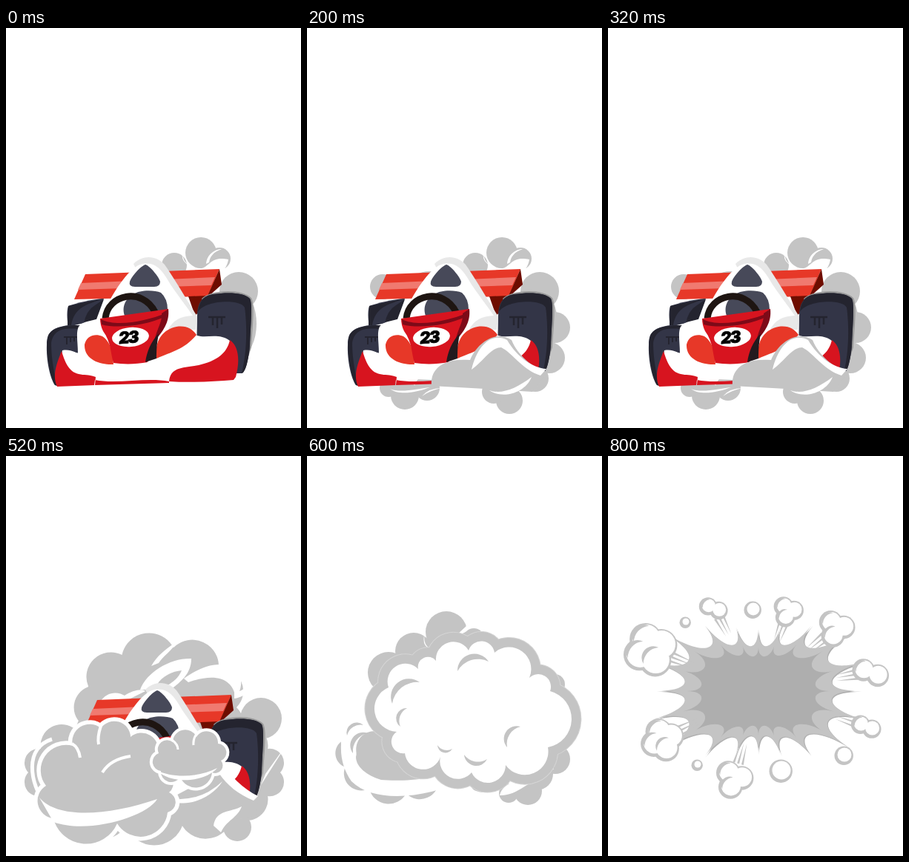
An HTML page that plays this animation: 398x541 px, repeating every 1 s.

```html
<!DOCTYPE html>
<html>
<head>
<meta charset="utf-8">
<style>
html, body { margin: 0; width: 100%; height: 100%; overflow: hidden; background: #fff; }
svg { display: block; width: 398px; height: 541px; }
text { font: italic 900 22px Inter, "DejaVu Sans", sans-serif; letter-spacing: -1.8px; }
</style>
</head>
<body>
<svg id="stage" viewBox="0 0 398 541"></svg>
<script>
const GREY = '#c4c4c4', WHITE = '#fff', NAVY = '#333547', INK = '#24242f',
  RED = '#d7141f', ORANGE = '#e73828', SLATE = '#474959', WINE = '#7d0a18';
const TAU = 2 * Math.PI;

const fill = (color, ...paths) => `<path fill="${color}" d="${paths.join('')}"/>`;
const line = (color, width, d) =>
  `<path fill="none" stroke="${color}" stroke-width="${width}" d="${d}"/>`;
const oval = (color, x, y, rx, ry = rx) =>
  `<ellipse fill="${color}" cx="${x}" cy="${y}" rx="${rx}" ry="${ry}"/>`;
const points = text => text.split(' ').map(p => p.split(',').map(Number));
const discs = text => points(text).map(c => oval(GREY, ...c)).join('');

// Arc from a to b; rise is its height relative to the chord.
function arc(a, b, rise) {
  const r = Math.hypot(b[0] - a[0], b[1] - a[1]) * (rise / 2 + 1 / (8 * rise));
  return `A${r} ${r} 0 0 ${+(rise > 0)} ${b.join(' ')}`.replace(/A-(\S+) -/, 'A$1 ');
}
const scallop = (pts, rise) =>
  `M${pts[0].join(' ')}` + pts.map((p, i) => arc(p, pts[(i + 1) % pts.length], rise)).join('');

// Scalloped ellipse with n equal bumps.
const blob = (x, y, rx, ry, n) => fill(GREY, scallop(
  Array.from({ length: n }, (_, i) => [x + rx * Math.cos(i / n * TAU), y + ry * Math.sin(i / n * TAU)]), .35));

// Cloud given by the notches between its bumps.
const cloud = (notches, color, rim, width, rise = .4) =>
  `<path fill="${color}" stroke="${rim}" stroke-width="${width}" paint-order="stroke" stroke-linejoin="round" d="${scallop(points(notches), rise)}"/>`;

const crescent = (x1, y1, x2, y2) =>
  fill(GREY, `M${x1} ${y1}`, arc([x1, y1], [x2, y2], .38), arc([x2, y2], [x1, y1], -.2));

const car = [
  // rear wing
  fill(ORANGE, 'M107 333L288 326L272 363L92 367Z'),
  fill('#f07a70', 'M101 345L282 337L277 348L97 354Z'),
  fill('#6e0d00', 'M288 326L291 347L272 364L270 375L255 389L246 363L272 362Z'),
  // left tyres
  fill(NAVY, 'M84 376C95 372 115 367 132 366L118 396L84 404C82 392 82 382 84 376Z'),
  fill(INK, 'M84 376L132 366C108 374 92 378 88 402H83Z', 'M132 367L120 375Q108 382 105 400L122 394Z'),
  fill(NAVY, 'M84 402C64 405 55 410 55 428C54 450 60 475 66 483L74 484C70 460 72 445 80 437L100 440L104 402Z'),
  fill(INK, 'M57 416C62 405 78 402 100 402L97 407C76 405 64 409 61 426C61 450 66 470 69 484L66 483C57 465 53 430 57 416Z'),
  line(INK, 2, 'M78 418H96M82 418V428M87 418V425M92 418V424'),
  // body
  fill('#e8e8e8', 'M172 319C185 306 203 308 214 320C228 340 245 370 258 390L256 408L215 407Z'),
  fill(WHITE, 'M124 400C146 352 168 322 184 319C204 316 212 330 222 347C235 366 246 380 252 389C232 390 224 398 218 409L190 440Z'),
  // right tyre
  fill('#999', 'M264 366C276 354 318 352 331 365C336 374 333 400 331 432L320 466Z'),
  fill(NAVY, 'M258 390C258 370 266 362 280 360C300 357 322 358 329 366C333 374 330 400 329 430C327 450 323 466 318 467H300L257 440Z'),
  fill(INK, 'M259 384C261 368 268 362 280 360C300 357 322 358 329 366C333 374 330 400 329 430C327 450 323 466 318 467C326 435 325 400 322 378C316 366 268 368 259 384Z'),
  line(INK, 2.5, 'M273 391H296M279 391V402M285 391V406M291 391V401'),
  // front wing
  fill(WHITE, 'M76 436C88 434 95 440 97 440C97 425 94 412 98 404C104 396 116 396 127 393L146 455L190 452L240 405L258 416C270 420 288 412 302 423C312 430 313 455 308 475L225 478L118 474L69 484Z'),
  fill(RED, 'M75 437C68 455 62 470 69 485L120 483L121 472C110 468 106 470 98 468C84 465 79 450 75 437Z',
    'M120 476C150 482 190 472 220 478V480L119 483Z',
    'M220 478C222 458 238 460 260 456C285 450 298 440 302 422C314 430 316 450 310 472L307 476C280 478 250 480 220 478Z'),
  fill(ORANGE, 'M106 428C109 416 120 413 130 417C142 425 144 440 145 455C130 456 105 450 106 428Z',
    'M203 447C200 425 210 408 230 404C245 402 252 408 257 415C240 435 225 437 203 447Z'),
  // cockpit
  fill(SLATE, 'M188 320C195 322 207 338 208 343Q208 350 200 350H174Q165 350 167 343C170 335 182 322 188 320Z',
    'M172 360C180 354 200 354 209 358Q218 366 218 381L160 389C155 374 165 363 172 360Z'),
  line('#1e1512', 9, 'M134 393C137 360 184 350 201 384'),
  // nose
  fill(RED, 'M127 393L219 380C220 400 205 412 198 428C192 440 192 448 191 452C175 455 158 455 145 453C141 440 142 425 131 410Q127 402 127 393Z'),
  fill(WINE, 'M128 394C150 405 190 396 215 386L213 391C190 402 150 407 129 401Z',
    'M219 380C221 398 212 410 200 424C204 405 211 398 210 386Z'),
  fill('#231a1e', 'M206 413C203 430 203 438 203 447L188 452C190 438 195 425 206 413Z'),
  `<g transform="rotate(-5 168 418)">${oval(WHITE, 168, 418, 25, 13)}<text x="152" y="426" stroke="#000" stroke-width=".7">23</text></g>`,
].join('');

const exhaust = discs('227,321,17 263,304,21 288,312,15 314,356,26 317,400,21,42')
  + fill(WHITE, 'M262 326C276 322 276 308 300 313C299 322 292 330 290 333L288 326Z',
    'M270 319C271 306 282 299 291 299C279 303 275 310 274 317Z', 'M238 304Q238 315 247 321Q236 316 238 304Z');

const start = exhaust + car;

const smoking = exhaust
  + discs('102,350,17 165,346,25,17 334,405,21 327,446,21 308,474,18 273,504,18 252,492,16 162,487,17 132,497,19 110,487,12')
  + fill(WHITE, 'M110 345C124 334 150 336 160 333L145 352Z') + car
  + fill(GREY, 'M168 484C166 462 182 446 220 449C230 425 255 408 276 422C284 442 304 460 325 465L304 492L240 488Z')
  + fill(WHITE, 'M222 462C230 428 250 411 270 422C284 446 305 460 323 461L315 470C290 462 278 440 262 432C248 432 240 449 222 462Z',
    'M246 490C262 496 282 488 303 472C294 495 262 502 246 490Z',
    'M112 488C125 494 150 488 166 486C150 492 125 498 112 488Z', 'M155 498Q164 487 182 487Q166 490 155 498Z');

const engulfed = blob(208, 340, 103, 82, 9) + blob(200, 428, 170, 74, 14) + discs('344,355,28 312,502,19')
  + fill(WHITE, 'M181 316C190 292 222 273 250 274C250 295 235 306 222 316Z',
    'M196 284C205 268 218 260 230 251C226 262 212 270 206 280Z',
    'M240 301C262 285 292 273 313 291C321 305 316 320 310 327C306 302 285 292 246 306Z',
    'M308 320C322 318 330 308 328 296C335 316 322 326 308 328Z',
    'M126 334C136 317 152 319 160 324C170 317 184 314 188 318L160 332Z')
  + line(WHITE, 5, 'M62 383C25 395 30 440 56 476')
  + fill(GREY, 'M204 309C210 298 225 291 237 290C233 300 225 306 218 310Z')
  + `<g transform="translate(16 -3)">${car}</g>`
  + fill(GREY, 'M218 465L250 448L292 422L312 448L340 462L338 487L285 495H225Z')
  + fill(WHITE, 'M291 416C302 432 320 450 340 460L334 466C314 458 298 445 288 430Z',
    'M280 500C283 478 304 482 318 474C312 490 298 492 290 509Z',
    'M344 445L380 388L350 430Z', 'M228 464Q265 466 292 440C278 462 248 474 228 468Z')
  + cloud('64,490 54,446 90,392 128,368 168,380 205,402 210,428 220,455 218,482 150,497', GREY, WHITE, 11, .36)
  + fill(WHITE, 'M45 462C70 492 140 486 204 464C190 488 110 512 64 495Z')
  + line(WHITE, 4, 'M89 389Q98 394 100 408M128 365Q123 380 125 390M130 428Q141 410 168 406')
  + cloud('209,426 206,402 225,387 257,380 286,389 290,412 278,428 235,434', GREY, WHITE, 8)
  + fill(WHITE, 'M203 425C225 436 260 435 285 422C270 440 225 446 203 425Z')
  + line(WHITE, 3, 'M224 384Q232 390 232 397M258 375Q252 382 253 391');

const bank = '174,277 218,263 253,266 300,300 328,318 325,394 268,418 222,428 180,407 132,402 121,373 110,313 150,288';
const billow = discs('188,238,28 144,264,25 110,293,28 225,247,14 334,309,14') + blob(121, 402, 74, 55, 9)
  + fill(WHITE, 'M159 238Q156 254 165 260Q154 256 159 238Z', 'M216 229L202 242Q213 241 219 233Z',
    'M46 390C44 364 60 343 80 347L92 372C72 372 62 390 68 408C80 435 130 440 190 430L214 437C160 464 90 470 60 440C50 425 45 410 46 390Z')
  + fill(GREY, 'M66 407C69 385 85 375 100 372L190 420C180 440 120 440 100 438C80 432 66 420 66 407Z')
  + crescent(62, 402, 82, 375) + crescent(54, 378, 76, 364)
  + discs('298,453,19 335,410,20 272,456,13 240,447,18,8 310,430,22')
  + fill(WHITE, 'M260 459C264 440 290 438 310 430L322 433C300 438 284 460 260 459Z', 'M300 417L322 412L333 424Q315 424 300 417Z')
  + fill('#8b8b88', 'M336 394L338 404L333 422L328 417Z')
  + fill('#22252f', 'M318 395H336L331 417L316 411Z') + fill(RED, 'M319 396L325 400L321 412L313 409Z')
  + cloud(bank, WHITE, '#d5d5d5', 27) + cloud(bank, WHITE, GREY, 25)
  + crescent(203, 291, 245, 278) + crescent(115, 335, 152, 306) + crescent(126, 366, 135, 341)
  + crescent(270, 394, 288, 366) + crescent(196, 396, 176, 391) + crescent(243, 410, 212, 404);

// Lightning from its foot to its tip.
function bolt(color, x, y, tx, ty, width = 1) {
  const dx = tx - x, dy = ty - y;
  const at = (u, v) => `${x + dx * u - dy * v * width} ${y + dy * u + dx * v * width}`;
  return fill(color, `M${at(1, 0)}L${at(.55, .18)}L${at(.58, .05)}L${at(0, .09)}L${at(0, -.09)}L${at(.67, -.1)}L${at(.64, -.02)}Z`);
}

const swelling = discs('84,330,10 78,363,21 98,412,18 143,453,18 268,456,19 303,417,19 216,445,22,13')
  + fill(WHITE, 'M60 383L69 390L84 416C78 400 70 392 60 383Z', 'M112 446C125 452 140 448 156 440C150 458 122 462 112 446Z',
    'M238 458C245 444 262 444 275 433L290 438C270 446 264 468 238 458Z')
  + crescent(112, 446, 155, 438) + crescent(242, 464, 268, 444)
  + cloud('112,405 103,385 98,335 200,300 316,345 316,370 296,408 255,424 195,428 158,422', WHITE, GREY, 18)
  + crescent(110, 378, 113, 345) + crescent(178, 406, 160, 406) + crescent(220, 418, 192, 416)
  + bolt(GREY, 142, 255, 113, 207) + bolt(GREY, 267, 234, 292, 199)
  + bolt(GREY, 336, 327, 388, 333) + bolt(GREY, 133, 374, 116, 401)
  + cloud('138,263 165,258 206,241 231,244 278,260 320,276 335,317 280,347 246,376 166,374 113,341', WHITE, GREY, 17)
  + crescent(166, 374, 186, 333) + crescent(280, 350, 266, 332)
  + bolt(GREY, 276, 381, 304, 443, 1.7) + bolt(WHITE, 276, 380, 301, 434, 1.1);

const MID = [203, 318];

// Star on an ellipse: tips crowd towards top and bottom and reach furthest on the diagonals.
function burst(size, depth, color, shift = 0) {
  const n = 20;
  const tips = Array.from({ length: n }, (_, i) => {
    const t = i / n * TAU, a = t + .17 * Math.sin(2 * t);
    const r = size * (1 - .12 * Math.cos(4 * a));
    return [MID[0] + shift + 157 * r * Math.cos(a), MID[1] + shift + 97 * r * Math.sin(a)];
  });
  const pull = p => p.map((v, k) => v + (MID[k] - v) * depth).join(' ');
  return fill(color, `M${tips[0].join(' ')}`, ...tips.map((p, i) => {
    const q = tips[(i + 1) % n];
    return `C${pull(p)} ${pull(q)} ${q.join(' ')}`;
  }));
}

// n lobes around a centre; several lobes trail streaks towards the middle.
function puff([x, y, r, n]) {
  const lobes = Array.from({ length: n }, (_, i) => {
    const a = (i + .5) / n * TAU - 1.2, d = n > 1 ? r * .43 : 0;
    return [x + d * Math.cos(a), y + d * Math.sin(a), n > 1 ? r * .5 : r - 2.5];
  });
  const dx = MID[0] - x, dy = MID[1] - y, len = Math.hypot(dx, dy), ux = dx / len, uy = dy / len;
  const at = (u, v) => `${x + ux * u - uy * v} ${y + uy * u + ux * v}`;
  const streaks = n > 1 ? [-1, 0, 1].map(s =>
    fill(GREY, `M${at(r * .8, s * 6 - 1.5)}L${at(r + 24, s * 4)}L${at(r * .8, s * 6 + 1.5)}Z`)) : [];
  return [...streaks,
    ...lobes.map(([cx, cy, cr]) => oval(GREY, cx - .8, cy + 1.2, cr + 3.2)),
    ...lobes.map(([cx, cy, cr]) => oval(WHITE, cx, cy, cr)),
    ...lobes.slice(1).map(([cx, cy, cr]) => crescent(cx - cr * .9, cy + cr * .3, cx + cr * .2, cy - cr * .9)),
  ].join('');
}

const puffs = '58,261,37,4 143,205,18,2 196,207,11,1 243,209,20,3 308,232,25,3 355,292,24,2 349,365,19,2 '
  + '319,404,12,1 234,425,15,1 170,436,26,3 121,417,7,1 74,383,29,4 105,224,7,1';
const blast = burst(1, .4, '#b0b0b0', 1) + burst(.98, .38, GREY, -.5) + burst(.7, .3, '#aeaeae')
  + points(puffs).map(puff).join('');

const scenes = [[0, start], [200, smoking], [400, engulfed], [600, billow], [700, swelling], [800, blast]];
const stage = document.getElementById('stage');
stage.innerHTML = scenes.map(([, art]) => `<g>${art}</g>`).join('');
const layers = [...stage.children];
const origin = performance.now();

function draw(now) {
  const t = Math.max(0, now - origin) % 1000;
  const shown = scenes.filter(([from]) => from <= t).length - 1;
  layers.forEach((g, i) => g.style.display = i === shown ? '' : 'none');
  requestAnimationFrame(draw);
}
draw(origin);
</script>
</body>
</html>
```
